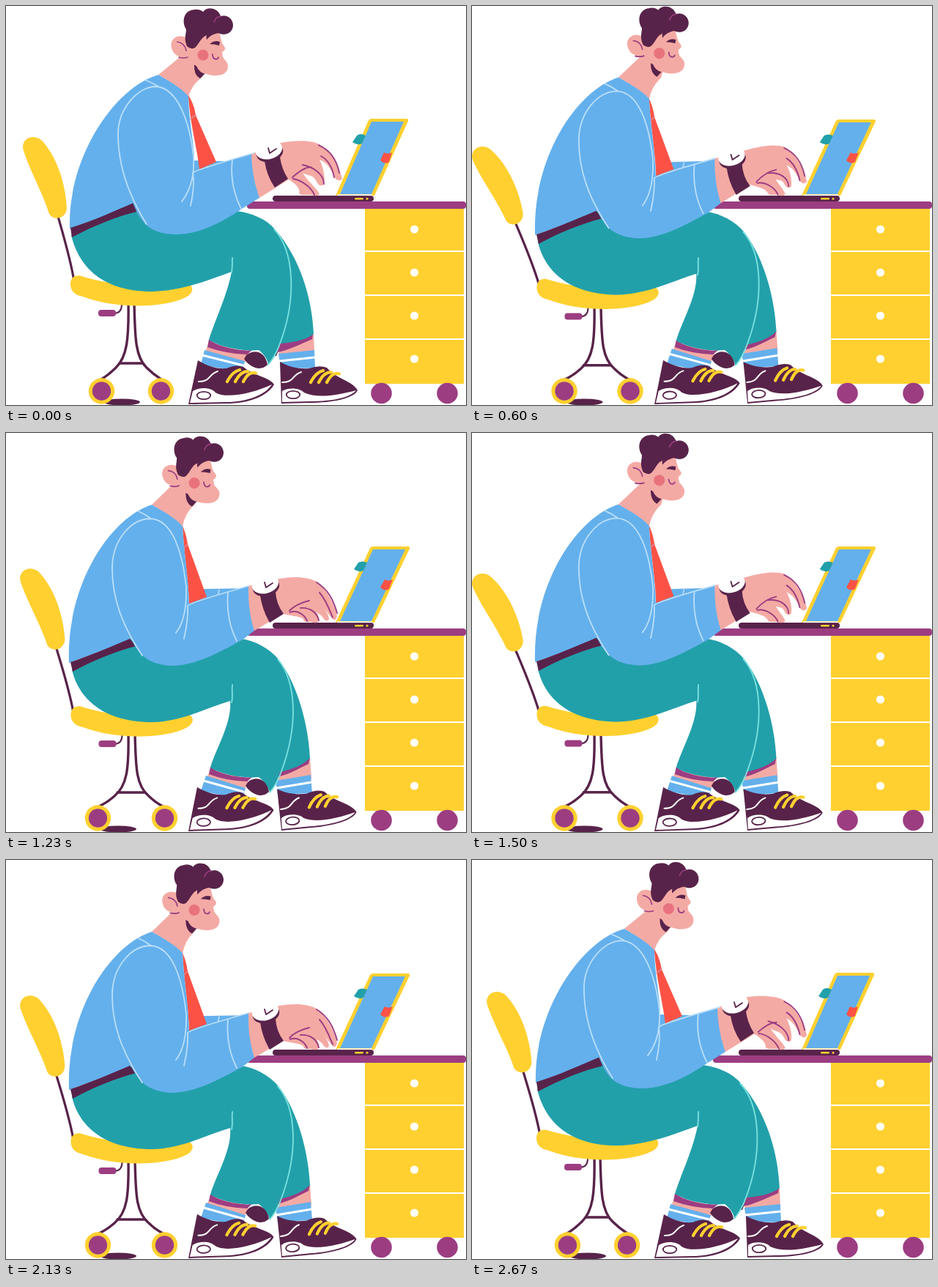
Recreate the animation shown at these times as an HTML page. Size 628 px wide and 545 px high, loop 2700 ms.

```html
<!DOCTYPE html>
<html lang="en">
<head>
<meta charset="utf-8">
<title>Typing at the desk</title>
<style>
html, body { margin: 0; width: 100%; height: 100%; overflow: hidden; background: #fff; }
svg { display: block; width: 628px; height: 545px; }
</style>
</head>
<body>
<svg id="stage" viewBox="0 0 628 545"></svg>
<script>
const YELLOW = '#ffd02f', PURPLE = '#9c3d82', DARK = '#58234a', TEAL = '#22a0aa', BLUE = '#64b0ec',
  SKIN = '#f4aaa4', RED = '#fc5246', PALE = '#b9dffa', MINT = '#7be3df', CHEEK = '#e8737f';
const PERIOD = 900, STEP = 30;
const stage = document.getElementById('stage');
const morphs = [];

function el(name, attrs, parent = stage) {
  const node = document.createElementNS('http://www.w3.org/2000/svg', name);
  for (const k in attrs) node.setAttribute(k, attrs[k]);
  return parent.appendChild(node);
}
const group = () => el('g', {});
const circle = (cx, cy, r, fill, g) => el('circle', { cx, cy, r, fill }, g);
const rect = (x, y, width, height, rx, fill, g) => el('rect', { x, y, width, height, rx, fill }, g);

// Registers a path that blends from pose a to pose b.
function blend(node, a, b, limb) {
  if (!b) return;
  const nums = s => s.match(/-?[\d.]+/g).map(Number);
  morphs.push({ node, a: nums(a), b: nums(b), cmds: a.match(/[A-Z]/g), limb });
}
function fill(color, a, b, g, limb) {
  blend(el('path', { d: a, fill: color }, g), a, b, limb);
}
function line(color, w, a, b, g, limb) {
  blend(el('path', { d: a, fill: 'none', stroke: color, 'stroke-width': w,
    'stroke-linecap': 'round', 'stroke-linejoin': 'round' }, g), a, b, limb);
}

// Chair
const back = group();
line(DARK, 3.2, 'M70 284C78 312 88 345 93 376', '', back);
fill(YELLOW, 'M23 193C23 178 41 174 51 186C69 207 81 240 83 276C82 291 65 294 59 284C50 255 34 228 24 198Z', '', back);

const shadow = group();
el('ellipse', { cx: 158, cy: 541, rx: 25, ry: 4.5, fill: DARK }, shadow);
line(DARK, 3.4, 'M167 404C168 455 165 480 150 494Q140 504 130 510', 'M167 408C168 460 165 482 148 496Q138 505 125 511');
line(DARK, 3.4, 'M175 404C176 455 177 480 192 494Q201 503 212 510', 'M176 408C177 460 178 482 195 496Q204 505 216 511');
line(DARK, 3.4, 'M155 488L187 488', 'M152 491L190 491');
const wheels = [130.5, 211.5].map(x => {
  const g = group();
  circle(x, 526, 17.7, YELLOW, g);
  circle(x, 526, 12.7, PURPLE, g);
  return g;
});
const seat = group();
line(DARK, 2, 'M148 420Q158 419 158 408', '', seat);
rect(126, 415, 24, 9, 4, PURPLE, seat);
fill(YELLOW, 'M88 380C88 369 97 366 106 370C150 383 210 386 250 380C258 385 254 394 245 398C215 413 150 414 105 397C95 395 88 390 88 380Z', '', seat);

// Desk and drawers
rect(329, 267, 299, 10, 4, PURPLE);
rect(490, 277, 135, 239, 0, YELLOW);
for (let i = 0; i < 4; i++) {
  if (i) rect(490, 274 + 60 * i, 135, 2, 0, '#fff');
  circle(557.5, 305 + 59 * i, 5.6, '#fff');
}
circle(512.5, 529, 14.3, PURPLE);
circle(602.5, 529, 14.3, PURPLE);

// Laptop
fill(YELLOW, 'M498 154L547 154Q550 154 549 157L503 259L450 259L495 156Z', 'M500 155L549 155Q552 155 551 158L503 259L450 259L497 157Z');
fill(BLUE, 'M499 158L543 158L499 257L456 257Z', 'M501 159L545 159L499 257L456 257Z');
fill(TEAL, 'M479 177Q484 173 491 177L486 188Q480 191 473 186Z', 'M481 177Q486 174 493 177L488 188Q482 191 475 186Z');
fill(RED, 'M516 200Q521 203 527 200L523 213Q517 217 511 211Z', 'M517 200Q522 203 528 200L523 213Q517 217 511 211Z');
rect(364, 259, 138, 8, 4, DARK);
rect(452, 257.5, 48, 1.6, 0, '#fff');
rect(476, 262, 12, 2.6, 1.3, YELLOW);
circle(493, 263.3, 1.5, YELLOW);

// Far leg
fill(SKIN, 'M374 462L420 448L421 474L372 477Z', 'M371 462L415 443L417 472L368 477Z');
fill(BLUE, 'M372 475L421 470L422 495L375 494Z', 'M368 475L416 467L418 492L371 494Z');
line('#fff', 3, 'M373 485L421 480', 'M369 485L417 477');
// Near shin
fill(SKIN, 'M277 460L332 473L326 487L272 472Z', 'M279 460L332 472L326 487L274 471Z');
fill(BLUE, 'M271 470L326 485L322 500L266 490Z', 'M273 468L327 485L323 500L266 489Z');
line('#fff', 3, 'M268 477L324 491', 'M270 475L324 490');

function laces(g, dx, dy) {
  for (const x of [0, 11, 22])
    line(YELLOW, 4.2, `M${302 + x + dx} ${513 + dy}C${306 + x + dx} ${505 + dy} ${311 + x + dx} ${499 + dy} ${319 + x + dx} ${497 + dy + x / 5}`, '', g);
  line('#fff', 2, `M${263 + dx} ${513 + dy}C${280 + dx} ${513 + dy} ${276 + dx} ${503 + dy} ${289 + dx} ${499 + dy}`, '', g);
}
function ring(g, cx, cy) {
  el('ellipse', { cx, cy, rx: 9.2, ry: 5.2, fill: '#fff', stroke: DARK, 'stroke-width': 1.8 }, g);
}
const nearShoe = group(), farShoe = group();
fill(DARK, 'M262 484C275 492 288 496 301 495Q314 489 324 493C340 506 360 507 366 517C357 533 332 543 300 543L249 544Z', '', nearShoe);
fill('#fff', 'M251 542L255 526C265 520 280 521 286 528C300 537 338 529 363 517C354 531 330 541 300 541Z', '', nearShoe);
ring(nearShoe, 270, 532);
laces(nearShoe, 0, 0);
fill(DARK, 'M374 486C388 494 402 496 414 495Q428 490 438 494C452 510 473 512 480 525C475 536 445 542 415 542L376 543Z', '', farShoe);
fill('#fff', 'M377 541L377 526C386 520 402 522 407 528C425 537 455 531 478 525C470 535 445 540 415 540Z', '', farShoe);
ring(farShoe, 392, 531);
laces(farShoe, 114, 1);

// Trousers
fill(DARK, 'M358 478L373 468L369 478Z', 'M358 478L371 468L367 477Z');
fill(PURPLE, 'M371 461L419 448L418 455C402 462 386 470 370 473Z', 'M370 462L415 443L413 452C398 459 384 468 368 470Z');
fill(PURPLE, 'M277 455C290 466 320 472 336 470L329 476Q300 475 275 466Z', 'M279 456C290 466 320 472 336 470L329 476Q300 475 277 466Z');
fill(TEAL, 'M89 313C98 350 125 390 200 390C240 389 275 375 308 363C302 395 285 430 277 456C295 467 325 472 345 470C352 475 358 484 358 490C365 483 370 475 374 461C390 460 408 457 420 448C418 400 402 345 368 306C355 290 335 283 315 280L180 270Z',
  'M90 323C97 355 125 395 200 395C240 394 275 375 306 366C309 395 287 430 279 457C295 467 325 472 345 470C352 475 359 485 360 491C366 484 370 475 374 463C388 460 404 455 415 444C413 400 399 345 372 309C358 293 340 284 322 281L175 280Z');
fill(DARK, 'M328 477C338 468 354 471 357 490Q350 497 340 494Q330 490 325 482Z', 'M330 477C340 468 356 472 359 490Q352 497 342 494Q332 490 327 482Z');
line(MINT, 1.8, 'M366 305C394 335 397 400 374 461Q368 478 358 490', 'M371 309C397 340 399 400 376 462Q370 480 360 491');
line(MINT, 1.8, 'M309 344C309 353 309 358 308 364', 'M309 344C308 353 310 360 308 368');

// Torso
fill(SKIN, 'M208 94L242 66L274 80L268 97Q253 108 249 124C238 112 222 102 208 94Z', 'M199 98L230 68L262 80L257 98Q244 110 241 128C230 116 213 106 199 98Z');
fill(BLUE, 'M256 211L300 212L320 207L300 232L256 230Z', 'M250 215L272 213L334 212L330 225L250 237Z');
line(PALE, 1.5, 'M275 214L273 222', 'M291 214L289 223');
fill(RED, 'M249 122Q257 134 259 149L287 213L264 223C261 195 252 165 249 124Z', 'M241 127Q246 138 248 152L274 224L250 233C249 200 243 165 241 128Z');
line('#d98a9e', 1.6, 'M252 154L259 149', 'M242 157L248 152');
fill(BLUE, 'M208 94C150 110 84 205 87 304L180 271L257 224C259 195 250 165 249 123C238 111 222 102 208 94Z',
  'M199 98C140 117 82 210 86 314L172 282L250 234C249 195 243 165 241 127C230 115 213 106 199 98Z');
fill(DARK, 'M88 303C118 294 150 279 174 269L182 280C152 287 120 300 90 316Z', 'M88 313C115 304 145 291 169 281L178 291C150 298 120 310 91 326Z');
line(PALE, 1.8, 'M190 101Q200 105 208 110', 'M181 107Q190 111 198 117');

// Hand, with fingers on their own beat
fill(SKIN, 'M335 202L375 187C395 183 418 183 428 189C445 200 455 220 459 236Q454 241 449 235C443 222 439 214 428 210C434 222 436 235 434 244Q428 248 424 240C420 230 412 232 405 228C412 240 424 248 428 257Q424 261 418 258L408 258Q403 259 400 256C402 250 396 243 386 237L346 262L330 270Z',
  'M331 209L373 199C395 195 413 197 424 203C440 216 449 236 452 250Q450 258 446 254C440 247 437 243 434 238C438 245 441 250 441 255Q436 259 432 251C430 249 428 247 424 245C426 248 428 254 427 257Q424 261 417 258L411 258Q406 258 406 254C400 250 390 250 378 247L339 270L325 275Z', stage, true);
const creases = [
  ['M427 190C445 198 452 212 455 228', 'M424 204C440 214 447 228 452 246'],
  ['M430 205C440 210 446 222 448 234', 'M428 218C437 228 441 240 446 252'],
  ['M391 234C400 226 408 220 416 220', 'M387 243C393 236 405 231 414 229'],
  ['M405 217C420 220 434 230 434 243', 'M402 239C416 238 425 246 427 256'],
  ['M392 236C404 238 417 248 421 258', 'M388 245C397 241 408 248 411 257']];
for (const [a, b] of creases) line(PURPLE, 1.9, a, b, stage, true);

fill(DARK, 'M353 212L374 206Q376 222 385 236L367 248Q356 232 353 212Z', 'M347 222L368 217Q369 234 379 247L360 259Q350 242 347 222Z');
const watch = group();
el('ellipse', { cx: 360, cy: 200, rx: 18.5, ry: 13, fill: DARK, transform: 'rotate(-14 360 200)' }, watch);
el('ellipse', { cx: 359, cy: 196.5, rx: 18.5, ry: 12.5, fill: '#fff', transform: 'rotate(-14 359 197)' }, watch);
line(DARK, 1.8, 'M358 194L360 201L369 195', '', watch);

// Near sleeve
fill(BLUE, 'M153 175C151 140 180 110 205 110C238 112 250 170 256 226L335 202Q336 235 346 262L322 277C290 299 260 312 232 312C200 311 188 300 178 280C160 240 153 210 153 175Z',
  'M145 185C143 145 170 117 197 117C228 118 241 165 249 234L331 209Q330 242 339 270L322 283C290 300 260 317 228 318C195 317 182 303 172 284C155 245 145 215 145 185Z');
line(PALE, 1.8, 'M192 298C165 255 153 215 153 175C153 140 180 110 205 110C235 112 251 160 256 205C258 235 250 254 240 267',
  'M186 304C158 262 145 225 145 185C145 145 172 117 197 117C228 118 241 165 246 210C247 240 242 260 232 273');
line(PALE, 1.8, 'M252 273Q258 245 255 228Q258 224 338 201', 'M243 281Q249 255 248 236Q250 232 331 209');
line(PALE, 1.8, 'M309 210C306 235 311 257 321 277', 'M303 218C301 240 305 264 315 284');

// Head
const head = group();
fill(DARK, 'M257 80Q256 94 265 99L272 92L266 82Z', '', head);
fill(SKIN, 'M246 43C232 37 223 47 226 57C228 68 240 72 248 69Z', '', head);
fill(SKIN, 'M243 48C243 62 239 68 244 73Q257 80 260 82Q264 92 274 93C286 97 303 96 303 82C303 77 298 73 296 70L295 63Q300 60 299 57C297 53 295 52 294 47L291 34L255 36Z', '', head);
fill(DARK, 'M246 52C243 44 246 38 246 32C240 24 241 6 257 5C263 4 267 6 269 8C273 1 289 1 293 14C302 11 310 18 310 26C310 36 300 42 290 37C283 38 278 41 274 46Q273 43 274 40C266 43 265 50 258 57Q253 60 247 55Z', '', head);
line(PURPLE, 1.5, 'M284 22Q286 15 293 14', '', head);
line(PURPLE, 1.7, 'M234 49C241 50 245 55 246 61', '', head);
line(PURPLE, 1.7, 'M236 70Q242 72 248 70', '', head);
fill(DARK, 'M278 52Q285 46 292 49L291 54Q285 52 278 52Z', '', head);
line(PURPLE, 1.8, 'M282 66Q282 72 286 72.5Q289 73 290 70', '', head);
circle(269, 67, 7.6, CHEEK, head);

const wave = (t, lag, period = PERIOD) => Math.cos(2 * Math.PI * (t - lag) / period);
const clamp = v => Math.max(0, Math.min(1, v));
const move = (node, x, y, turn = '') => node.setAttribute('transform', `translate(${x.toFixed(2)} ${y.toFixed(2)}) ${turn}`);

function draw(t) {
  const lean = (1 - wave(t, 0)) / 1.67;
  const tap = ((1 - wave(t, 60, PERIOD / 2)) / 2 - .165) / .74;
  for (const m of morphs) {
    let i = 0;
    const pts = { M: 2, L: 2, Q: 4, C: 6, Z: 0 };
    let d = '';
    for (const c of m.cmds) {
      d += c;
      for (let n = 0; n < pts[c]; n++, i++) {
        const x = m.a[i - i % 2];
        const w = m.limb ? lean + (tap - lean) * clamp((x - 370) / 60) : lean;
        d += (m.a[i] + (m.b[i] - m.a[i]) * w).toFixed(2) + ' ';
      }
    }
    m.node.setAttribute('d', d);
  }
  move(back, -lean, 5.5 * lean, `rotate(${4.6 * (wave(t, 150) - .5)} 93 380)`);
  move(seat, .5 * lean, 5 * lean);
  move(shadow, -5 * lean, 0);
  move(wheels[0], -5 * lean, 0);
  move(wheels[1], 5 * lean, 0);
  move(nearShoe, 0, 0, `rotate(${-lean} 250 543)`);
  move(farShoe, 0, 0, `rotate(${-4 * lean} 376 542)`);
  move(watch, -5 * lean, 10 * lean);
  move(head, 8 * (wave(t, 30) - .978), 2.5 * wave(t, 180) - .77 + lean, `rotate(${-1.5 * lean} 265 70)`);
}

function tick() {
  draw(Math.floor(performance.now() / STEP) * STEP % (3 * PERIOD));
  requestAnimationFrame(tick);
}
tick();
</script>
</body>
</html>
```
